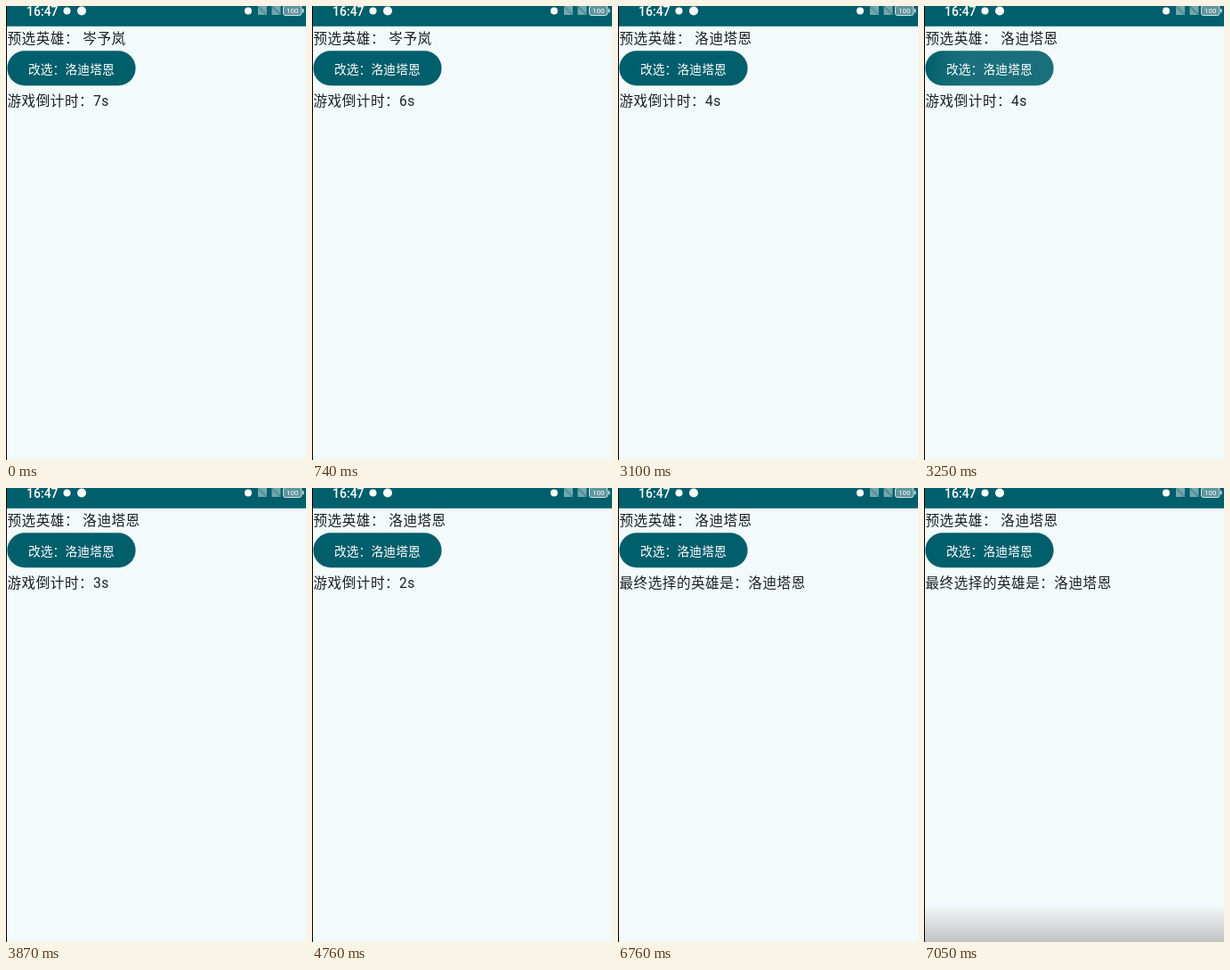
Recreate the animation shown at these times as an HTML page. Size 337 by 509 pixels, loop 8000 ms.

```html
<!DOCTYPE html>
<html lang="zh-CN">
<head>
<meta charset="utf-8">
<title>英雄选择倒计时</title>
<style>
  html, body { margin: 0; width: 100%; height: 100%; overflow: hidden; background: #f2fafc; }
  svg { display: block; width: 337px; height: 509px; }
  text { font-family: Roboto, "Noto Sans CJK SC", "Noto Sans CJK", sans-serif; white-space: pre; }
  .body { font-size: 15.6px; letter-spacing: .5px; fill: #1d2021; }
  .label { font-size: 13.75px; letter-spacing: .1px; fill: #fff; }
  .clock { font-size: 14px; font-weight: 500; fill: #fff; }
</style>
</head>
<body>
<svg viewBox="0 0 337 509" lang="zh-CN">
  <defs>
    <linearGradient id="press" gradientUnits="userSpaceOnUse" x1="1" y1="0" x2="44" y2="0">
      <stop offset="0" stop-color="#fff" stop-opacity="0"/>
      <stop offset=".4" stop-color="#fff" stop-opacity=".05"/>
      <stop offset="1" stop-color="#fff" stop-opacity=".1"/>
    </linearGradient>
    <linearGradient id="shade" x2="0" y2="1">
      <stop offset="0" stop-color="#eef3f3"/>
      <stop offset="1" stop-color="#c1c4c4"/>
    </linearGradient>
    <g id="noSim">
      <path d="M1 0H10V9ZM0 1V10H9Z" fill="#fff" opacity=".45"/>
      <path d="M0 0L10 10" stroke="#fff" opacity=".5"/>
    </g>
  </defs>

  <rect width="337" height="509" fill="#f2fafc"/>
  <rect width="337" height="22.8" fill="#005f6b"/>

  <text class="clock" x="23" y="10.8">16:47</text>
  <g fill="#fff">
    <circle cx="68.5" cy="5.5" r="4"/>
    <circle cx="85" cy="5.5" r="5"/>
    <circle cx="272" cy="5.5" r="4"/>
  </g>
  <use href="#noSim" x="283"/>
  <use href="#noSim" x="298.5"/>
  <rect x="311.5" y="-.5" width="20.5" height="11" rx="2.5" fill="#5f959d" stroke="#d5e5e7"/>
  <rect x="333" y="3" width="1.5" height="4.5" rx=".7" fill="#d5e5e7"/>
  <text x="321.8" y="8.2" font-size="8" text-anchor="middle" fill="#fff">100</text>

  <text class="body" id="hero" x="1.5" y="41.8"></text>
  <rect x="1.4" y="50.2" width="144.2" height="39" rx="19.5" fill="#005f6b"/>
  <rect id="ripple" x="1.4" y="50.2" width="144.2" height="39" rx="19.5"/>
  <text class="label" id="button" x="24.9" y="76"></text>
  <text class="body" id="status" x="1.5" y="112"></text>

  <rect id="bottom" x="1" y="471" width="336" height="38" fill="url(#shade)"/>
  <rect width="1" height="509" fill="#000"/>
</svg>
<script>
  const LOOP = 8000;
  const FIRST = '岑予岚', SECOND = '洛迪塔恩';
  const ticks = [740, 1770, 2790, 3870, 4760, 5830];
  const [hero, button, ripple, status, bottom] =
    ['hero', 'button', 'ripple', 'status', 'bottom'].map(id => document.getElementById(id));

  const setText = (el, value) => {
    if (el.textContent !== value) el.textContent = value;
  };

  function render(t) {
    const left = 7 - ticks.filter(at => t >= at).length;
    setText(hero, '预选英雄： ' + (t < 3100 ? FIRST : SECOND));
    setText(status, t < 6760 ? `游戏倒计时：${left}s` : '最终选择的英雄是：' + SECOND);

    const pressed = t >= 3250 && t < 3870;
    ripple.setAttribute('fill', t < 3410 ? 'url(#press)' : '#fff');
    ripple.setAttribute('opacity', !pressed ? 0 : t < 3410 ? 1 : t < 3710 ? .1 : .04);
    bottom.setAttribute('opacity', t >= 7050 ? 1 : 0);
  }

  setText(button, '改选：' + SECOND);
  const start = performance.now();
  function loop() {
    render((performance.now() - start) % LOOP);
    requestAnimationFrame(loop);
  }
  loop();
</script>
</body>
</html>
```
